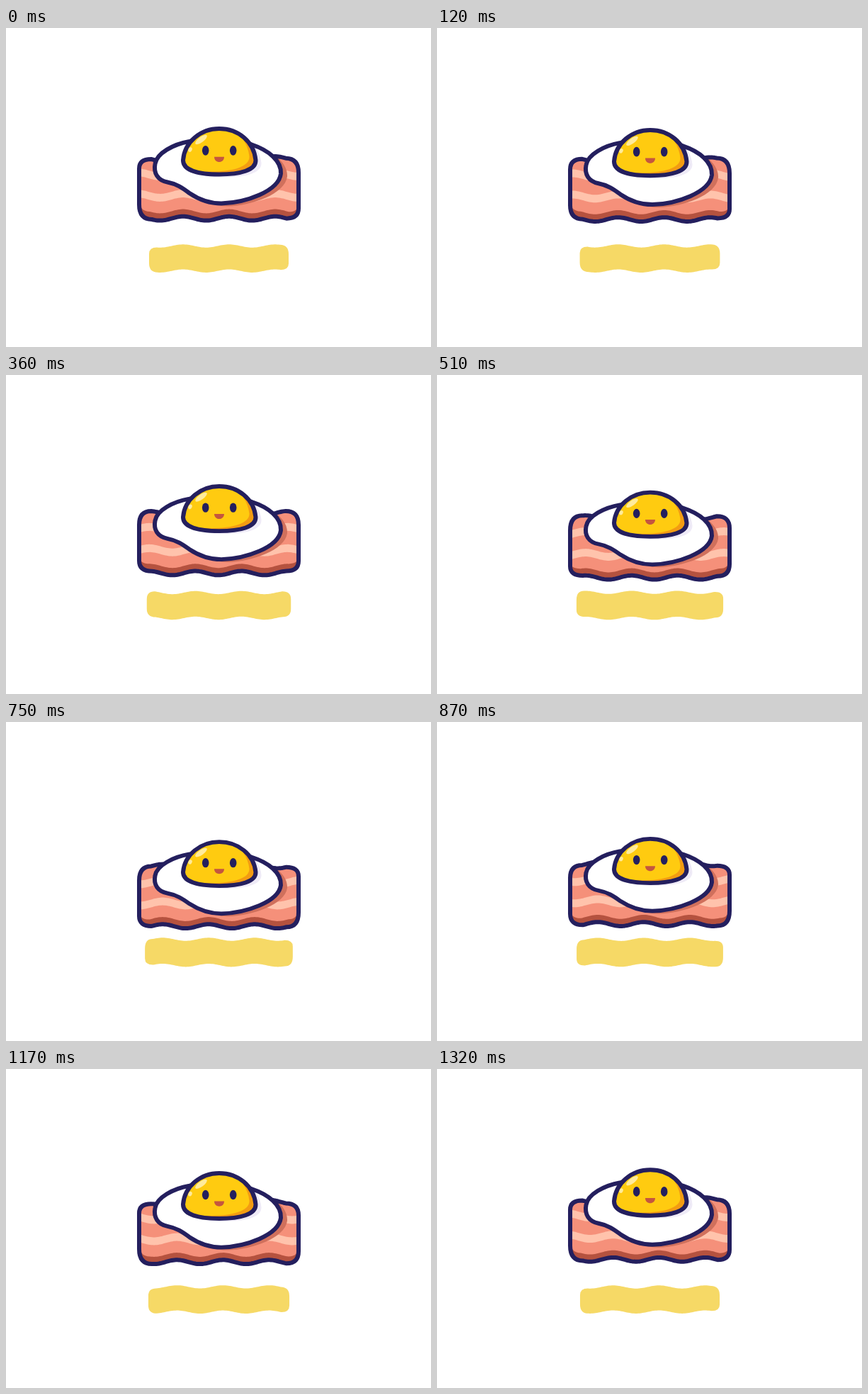
Write an HTML page with a canvas that moves like this. It is 600x450 px and loops after 1350 ms.

```html
<!DOCTYPE html>
<html>
<head>
<meta charset="utf-8">
<style>
html, body { margin: 0; width: 100%; height: 100%; overflow: hidden; background: #fff; }
canvas { display: block; }
</style>
</head>
<body>
<canvas id="stage" width="600" height="450"></canvas>
<script>
const ctx = document.getElementById('stage').getContext('2d');
const LOOP = 1350, STEP = 30, TAU = Math.PI * 2;
const INK = '#241f5e';

const white = new Path2D('M301 155 C283 155 271 157 259 159.5 C236 163.5 213 176 210.5 191' +
  ' C208 204 214 214.5 228 217 C241 219.5 249 225 259 232.5 C273 242 287 247 304 247' +
  ' C338 246 385 230 388 205 C389 187 371 172 347 164 C333 158 318 155 301 155 Z');
const yolk = new Path2D('M250 186 C252 160 275 141.5 301 141.5 C328 141.5 350 160 352.5 186' +
  ' C353 200 331 206 301 206 C271 206 250 200 250 186 Z');
const yolkLight = new Path2D('M246 186 C248 158 270 138 296 138 C325 138 341 158 343.5 181' +
  ' C344 195 320 202 290 202 C268 202 246 199 246 186 Z');
const mouth = new Path2D('M294 181.3 L308 181.3 C308 191 294 191 294 181.3 Z');

function fill(path, color) {
  ctx.fillStyle = color;
  ctx.fill(path);
}

function outline(path) {
  ctx.strokeStyle = INK;
  ctx.lineWidth = 6;
  ctx.lineJoin = 'round';
  ctx.stroke(path);
}

function ellipse(x, y, rx, ry, angle, color) {
  ctx.fillStyle = color;
  ctx.beginPath();
  ctx.ellipse(x, y, rx, ry, angle, 0, TAU);
  ctx.fill();
}

function clipped(path, draw) {
  ctx.save();
  ctx.clip(path);
  draw();
  ctx.restore();
}

// Rounded strip whose long edges follow y + wave(x).
function strip(left, right, top, bottom, r, wave) {
  const p = new Path2D();
  p.moveTo(left, top + r + wave(left));
  p.quadraticCurveTo(left, top + wave(left + r), left + r, top + wave(left + r));
  for (let x = left + r; x <= right - r; x += 2) p.lineTo(x, top + wave(x));
  p.quadraticCurveTo(right, top + wave(right - r), right, top + r + wave(right));
  p.lineTo(right, bottom - r + wave(right));
  p.quadraticCurveTo(right, bottom + wave(right - r), right - r, bottom + wave(right - r));
  for (let x = right - r; x >= left + r; x -= 2) p.lineTo(x, bottom + wave(x));
  p.quadraticCurveTo(left, bottom + wave(left + r), left, bottom - r + wave(left));
  p.closePath();
  return p;
}

// One wave, travelling a full wavelength per loop.
function ripple(phase, height) {
  return x => -height * Math.cos(((x - 250) / 65 - phase) * TAU);
}

function drawShadow(phase, drop) {
  const half = 98.5 + 6 * drop;
  const band = strip(300.5 - half, 300.5 + half, 307.5 - drop, 342.7 + drop * 0.5, 11, ripple(phase, 2.2));
  fill(band, '#f6d966');
}

function placeEgg(drop) {
  ctx.translate(0, 33.84 * drop + 0.5);
  ctx.scale(1, 1 - 0.042 * drop);
}

function drawBacon(phase, drop) {
  const dy = 20 * drop;
  const wave = ripple(phase, 2.9);
  const body = strip(188, 413, 184 + dy, 268.7 + dy, 17, wave);
  clipped(body, () => {
    fill(body, '#b5523f');
    fill(strip(188, 413, 174 + dy, 258.5 + dy, 14, wave), '#f5907a');
    for (const y of [201, 231]) {
      fill(strip(180, 421, y + dy, y + 11 + dy, 0, wave), '#ffc3ac');
    }
    ctx.save();
    placeEgg(drop);
    ctx.translate(9, 4);
    fill(white, '#d0705c');
    ctx.restore();
  });
  outline(body);
}

function drawEgg(drop) {
  ctx.save();
  placeEgg(drop);
  fill(white, '#fff');
  clipped(white, () => {
    ctx.save();
    ctx.translate(8, 4);
    fill(yolk, '#efebf7');
    ctx.restore();
  });
  outline(white);

  fill(yolk, '#f39c12');
  clipped(yolk, () => fill(yolkLight, '#ffcb10'));
  ellipse(275.5, 157, 10, 3.7, -0.64, '#ffeb9c');
  ellipse(260, 171, 2.6, 3.4, 0.4, '#ffeb9c');
  outline(yolk);

  ellipse(281.7, 172.3, 4.8, 6.9, 0, INK);
  ellipse(320.7, 172.3, 4.8, 6.9, 0, INK);
  fill(mouth, '#c4563f');
  ctx.restore();
}

function render(now) {
  const t = Math.floor(now % LOOP / STEP) * STEP;
  const phase = t / LOOP;
  const drop = (1 - Math.cos((t - 6) / LOOP * TAU)) / 2;
  ctx.fillStyle = '#fff';
  ctx.fillRect(0, 0, 600, 450);
  drawShadow(phase, drop);
  drawBacon(phase, drop);
  drawEgg(drop);
}

let start;
function tick(now) {
  start ??= now;
  render(now - start);
  requestAnimationFrame(tick);
}
render(0);
requestAnimationFrame(tick);
</script>
</body>
</html>
```
